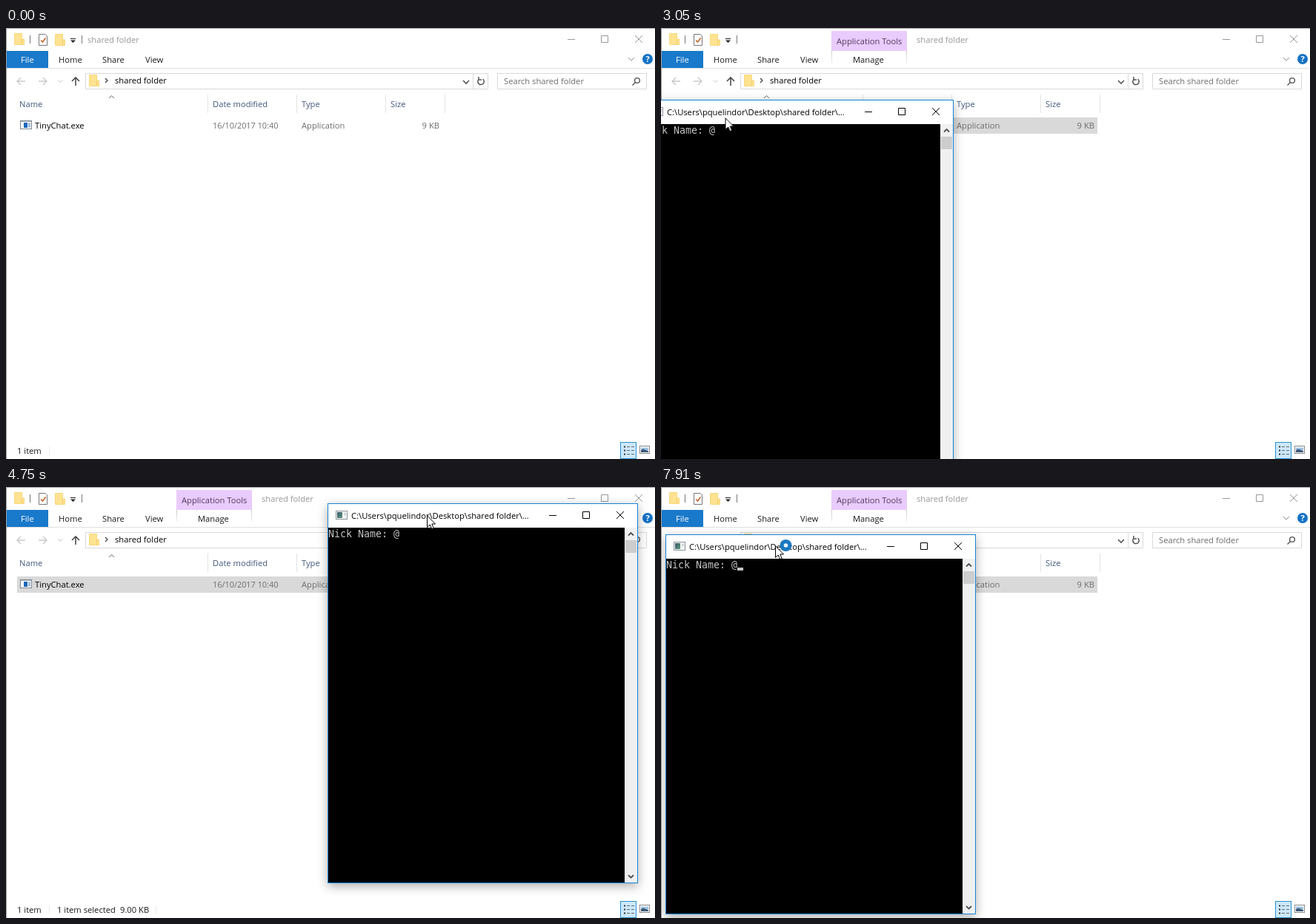
Recreate the animation shown at these times as an HTML page. Size 876x583 px, loop 7990 ms.

```html
<!DOCTYPE html>
<html lang="en">
<head>
<meta charset="utf-8">
<title>Shared folder</title>
<style>
  html, body { margin: 0; width: 100%; height: 100%; overflow: hidden; background: #fff; }
  svg { display: block; width: 100%; height: 100%; }
  text { font: 11.2px "Open Sans", "Noto Sans", sans-serif; fill: #1a1a1a; white-space: pre; }
  .line { fill: none; stroke: currentColor; }
  .heads text { fill: #44597a; }
  .info text { fill: #6d6d6d; }
  .info .date { font-size: 10.9px; }
  .mono { font: 13.3px "DejaVu Sans Mono", monospace; fill: #c4c4c4; }

  /* One shared clock: every part loops over the same 7990 ms. */
  .anim { animation: 7990ms step-end infinite; }
  #frame { animation-name: frame; }
  #caption { animation-name: caption; }
  #plain { animation-name: plain; }
  #picked, #status { animation-name: picked; }
  #row { animation-name: row; }
  #place { animation-name: place; }
  #console { animation-name: open; transform-origin: 209px 256px; }
  #caret { animation-name: blink; }
  #pointer { animation-name: point; }
  #busy { animation-name: busy; }

  @keyframes frame {
    0%, 27.65%, 83.47%, 100% { color: #a2a2a2; }
    25.53%, 78.59% { color: #1883d7; }
  }
  @keyframes caption {
    0%, 27.65%, 83.47%, 100% { color: #979797; }
    25.53%, 78.59% { color: #000; }
  }
  @keyframes plain {
    0% { visibility: visible; }
    23.65%, 100% { visibility: hidden; }
  }
  @keyframes picked {
    0% { visibility: hidden; }
    23.65%, 100% { visibility: visible; }
  }
  @keyframes row {
    0% { fill: #fff; stroke: #fff; }
    13.95% { fill: #e5f3ff; stroke: #e5f3ff; }
    23.65%, 68.96% { fill: #cce8ff; stroke: #99d1ff; }
    27.65%, 83.47%, 100% { fill: #d9d9d9; stroke: #d9d9d9; }
  }
  @keyframes place {
    0% { transform: translate(-24px, 97px); }
    39.17% { transform: translate(-24px, 97px); animation-timing-function: steps(7); }
    45.93% { transform: translate(19px, 68px); }
    46.93% { transform: translate(21px, 67px); }
    47.84% { transform: translate(21px, 67px); animation-timing-function: steps(4); }
    51.69% { transform: translate(248px, 40px); animation-timing-function: steps(5); }
    56.57% { transform: translate(434px, 22px); }
    78.59% { transform: translate(2px, 123px); }
    95.03% { transform: translate(2px, 123px); animation-timing-function: steps(4); }
    98.99%, 100% { transform: translate(6px, 64px); }
  }
  @keyframes open {
    0%, 78.59% { opacity: 0; transform: scale(.93); }
    27.65%, 83.47% { opacity: .5; transform: scale(.97); }
    28.66%, 84.35% { opacity: .91; transform: scale(.995); }
    29.53%, 85.35%, 100% { opacity: 1; transform: none; }
  }
  @keyframes blink {
    0%, 45.93%, 59.44%, 72.84% { opacity: 0; }
    39.17%, 52.69%, 66.08%, 92.61%, 100% { opacity: 1; }
  }
  @keyframes point {
    0% { visibility: hidden; transform: translate(707px, 570px); }
    6.25% { visibility: visible; transform: translate(707px, 570px); animation-timing-function: steps(4); }
    10.11% { visibility: visible; transform: translate(300px, 290px); animation-timing-function: steps(5); }
    14.89% { visibility: visible; transform: translate(63px, 124px); }
    18.77% { visibility: visible; transform: translate(63px, 126px); }
    19.64% { visibility: visible; transform: translate(63px, 129px); }
    35.33% { visibility: visible; transform: translate(63px, 129px); animation-timing-function: steps(4); }
    39.17% { visibility: visible; transform: translate(110px, 113px); animation-timing-function: steps(7); }
    45.93% { visibility: visible; transform: translate(153px, 84px); }
    46.93% { visibility: visible; transform: translate(155px, 83px); }
    47.84% { visibility: visible; transform: translate(155px, 83px); animation-timing-function: steps(4); }
    51.69% { visibility: visible; transform: translate(382px, 56px); animation-timing-function: steps(5); }
    56.57% { visibility: visible; transform: translate(568px, 38px); }
    62.24% { visibility: visible; transform: translate(568px, 38px); animation-timing-function: steps(5); }
    67.08% { visibility: visible; transform: translate(4px, 133px); }
    68.96% { visibility: visible; transform: translate(20px, 141px); }
    69.96% { visibility: visible; transform: translate(40px, 140px); }
    70.96% { visibility: visible; transform: translate(50px, 133px); }
    86.27% { visibility: visible; transform: translate(50px, 133px); animation-timing-function: steps(3); }
    89.19% { visibility: visible; transform: translate(95px, 154px); animation-timing-function: steps(4); }
    93.11% { visibility: visible; transform: translate(150px, 139px); }
    95.03% { visibility: visible; transform: translate(150px, 139px); animation-timing-function: steps(4); }
    98.99%, 100% { visibility: visible; transform: translate(154px, 79px); }
  }
  @keyframes busy {
    0% { opacity: 0; }
    83.47%, 100% { opacity: 1; }
  }
</style>
</head>
<body>
<svg viewBox="0 0 876 583">
  <defs>
    <g id="folder">
      <path d="M.5 .5H10.5V8H13.5V15.5H.5Z" fill="#ffe391" stroke="#f7d67c"/>
      <path d="M10.5 8.5V15" stroke="#f2cb68"/>
    </g>
    <g id="buttons" class="line">
      <path d="M0 .5H10M45.5 -4.5H54.5V4.5H45.5ZM91 -5L101 5M101 -5L91 5"/>
    </g>
    <path id="down" class="line" d="M-4 -2L0 2 4 -2"/>
    <linearGradient id="fade" x1="0" y1="0" x2="0" y2="1">
      <stop offset="0" stop-color="#c9c9c9"/>
      <stop offset="1" stop-color="#f4f4f4"/>
    </linearGradient>
    <linearGradient id="screen" x1="0" y1="0" x2="1" y2="1">
      <stop offset="0" stop-color="#39566b"/>
      <stop offset="1" stop-color="#5e9a7c"/>
    </linearGradient>
  </defs>

  <rect width="876" height="583" fill="#fff"/>
  <path id="frame" class="line anim" d="M876 .5H.5V583"/>

  <!-- title bar -->
  <use href="#folder" x="11" y="7"/>
  <use href="#folder" x="66" y="8"/>
  <path d="M32.5 10V21M102.5 10V21" stroke="#777"/>
  <path d="M44.5 8.5H53L55.5 11V23.5H44.5Z" fill="#fff" stroke="#777"/>
  <path d="M47 16.5L49.5 19 53.5 13.5" fill="none" stroke="#c0662b" stroke-width="1.6"/>
  <path d="M87 14H94V15H87ZM87 16.5H94L90.5 20Z" fill="#222"/>
  <g id="caption" class="anim">
    <text id="plain" class="anim" x="110" y="20" style="fill:currentColor">shared folder</text>
    <use href="#buttons" x="758" y="15"/>
    <g id="picked" class="anim">
      <rect x="230" y="4" width="102" height="27" fill="#eacbfd"/>
      <path d="M230 31H231V48H230ZM331 31H332V48H331Z" fill="url(#fade)"/>
      <text x="237" y="22" style="fill:#523a63">Application Tools</text>
      <text x="259" y="47">Manage</text>
      <text x="345" y="20" style="fill:currentColor">shared folder</text>
    </g>
  </g>

  <!-- ribbon tabs -->
  <path d="M1 54.5H876" stroke="#dfe0e1"/>
  <rect x="1" y="31" width="56" height="23" fill="#1979ca"/>
  <text x="20" y="47" style="fill:#fff">File</text>
  <text x="71" y="47">Home</text>
  <text x="130" y="47">Share</text>
  <text x="188" y="47">View</text>
  <use href="#down" x="844" y="42" color="#8c8c8c"/>
  <circle cx="866" cy="42" r="7" fill="#1472c4"/>
  <text x="863.4" y="46" style="fill:#fff;font-weight:700">?</text>

  <!-- navigation -->
  <path class="line" color="#c9c9c9" stroke-width="1.4" d="M26 72H15M20 67L15 72 20 77M44 72H55M50 67L55 72 50 77"/>
  <path class="line" color="#c4c4c4" d="M70.5 70.5L73.500 73.500 76.500 70.5"/>
  <path class="line" color="#4d4d4d" stroke-width="1.6" d="M94 78V67M89 72L94 67 99 72"/>
  <path class="line" color="#d9d9d9" d="M107.5 61.5H650.5V82.5H107.5ZM630.5 62V82M663.5 61.5H864.5V82.5H663.5Z"/>
  <use href="#folder" x="112" y="63"/>
  <path class="line" color="#444" stroke-width="1.3" d="M134 68L137 71 134 74"/>
  <text x="147" y="75" style="fill:#000">shared folder</text>
  <use href="#down" x="621" y="73" color="#555" stroke-width="1.6"/>
  <path class="line" color="#555" stroke-width="1.5" d="M638 69.500A4.200 4.200 0 1 0 643.500 69M638 66V70H642"/>
  <text x="672" y="76" style="fill:#6d6d6d">Search shared folder</text>
  <path class="line" color="#555" stroke-width="1.5" d="M849.500 73.500L845.500 77.500"/>
  <circle class="line" color="#555" stroke-width="1.4" cx="852" cy="71" r="3.400"/>

  <!-- file list -->
  <path class="line" color="#e3e3e3" d="M272.5 90V115M392.5 90V115M512.5 90V115M592.5 90V115"/>
  <path class="line" color="#666" d="M139 95L142.500 91.500 146 95"/>
  <g class="heads">
    <text x="18" y="107">Name</text>
    <text x="279" y="107">Date modified</text>
    <text x="399" y="107">Type</text>
    <text x="519" y="107">Size</text>
  </g>
  <rect id="row" class="anim" x="15.5" y="121.500" width="573" height="21"/>
  <rect x="19.5" y="125.500" width="15" height="11" fill="#fff" stroke="#7c8791"/>
  <path d="M20 126.500H34" stroke="#a9b4bd"/>
  <rect x="24" y="128" width="5" height="7" fill="#1668b8"/>
  <path d="M30 129.500H33M30 131.500H33M30 133.500H33" stroke="#4b7fb0"/>
  <text x="39" y="136" style="fill:#000">TinyChat.exe</text>
  <g class="info">
    <text class="date" x="279" y="136">16/10/2017 10:40</text>
    <text x="399" y="136">Application</text>
    <text x="585" y="136" text-anchor="end">9 KB</text>
  </g>

  <!-- status bar -->
  <text x="15" y="576">1 item</text>
  <path d="M58.5 566V578" stroke="#ececec"/>
  <g id="status" class="anim">
    <text x="69" y="576">1 item selected</text>
    <text x="154" y="576">9.00 KB</text>
    <path d="M202.5 566V578" stroke="#ececec"/>
  </g>
  <rect x="829.5" y="560.500" width="21" height="22" fill="#cce8ff" stroke="#2c8fcd"/>
  <path d="M834 566.500H836M834 571.500H836M834 576.500H836" stroke="#333" stroke-width="2"/>
  <path d="M838 566.500H842M844 566.500H848M838 571.500H842M844 571.500H848M838 576.500H842M844 576.500H848" stroke="#666"/>
  <rect x="855.5" y="565.500" width="13" height="10" fill="#fff" stroke="#888"/>
  <path d="M857 567.500H867V571H857Z" fill="#9cc3e4"/>
  <path d="M857 574V571L860 569.500 867 572V574Z" fill="#3d5a78"/>

  <!-- console window -->
  <g id="place" class="anim">
    <g id="console" class="anim">
      <rect x=".5" y=".5" width="418" height="513" fill="#fff" stroke="#1883d7" style="filter:drop-shadow(0 4px 7px rgba(0,0,0,.32))"/>
      <rect x="11.500" y="10.500" width="15" height="11" fill="#f3f5f6" stroke="#8d959c"/>
      <rect x="13" y="12" width="7" height="8" fill="url(#screen)"/>
      <path d="M22 13.500H25M22 15.500H25" stroke="#b4bbc1"/>
      <text x="32" y="21" style="fill:#000">C:\Users\pquelindor\Desktop\shared folder\...</text>
      <use href="#buttons" x="299" y="16" color="#000"/>
      <rect x="1" y="33" width="400" height="480" fill="#000"/>
      <rect x="401" y="33" width="17" height="480" fill="#f0f0f0"/>
      <rect x="402" y="50" width="15" height="17" fill="#cdcdcd"/>
      <path class="line" color="#505050" stroke-width="1.800" d="M406 43.500L409.500 40 413 43.500M406 503L409.500 506.500 413 503"/>
      <text class="mono" x="1" y="46">Nick Name: @</text>
      <rect id="caret" class="anim" x="97" y="45" width="8" height="4" fill="#c4c4c4"/>
    </g>
  </g>

  <!-- mouse pointer -->
  <g id="pointer" class="anim">
    <path d="M.5 .8V16.500L4.200 13 6.700 18.700 9.200 17.600 6.800 12H11.500Z" fill="#fff" stroke="#000"/>
    <g id="busy" class="anim">
      <circle cx="14.500" cy="0" r="8" fill="#1c78c0"/>
      <circle cx="14.500" cy="0" r="2.800" fill="#e8f4fc"/>
    </g>
  </g>
</svg>
</body>
</html>
```
